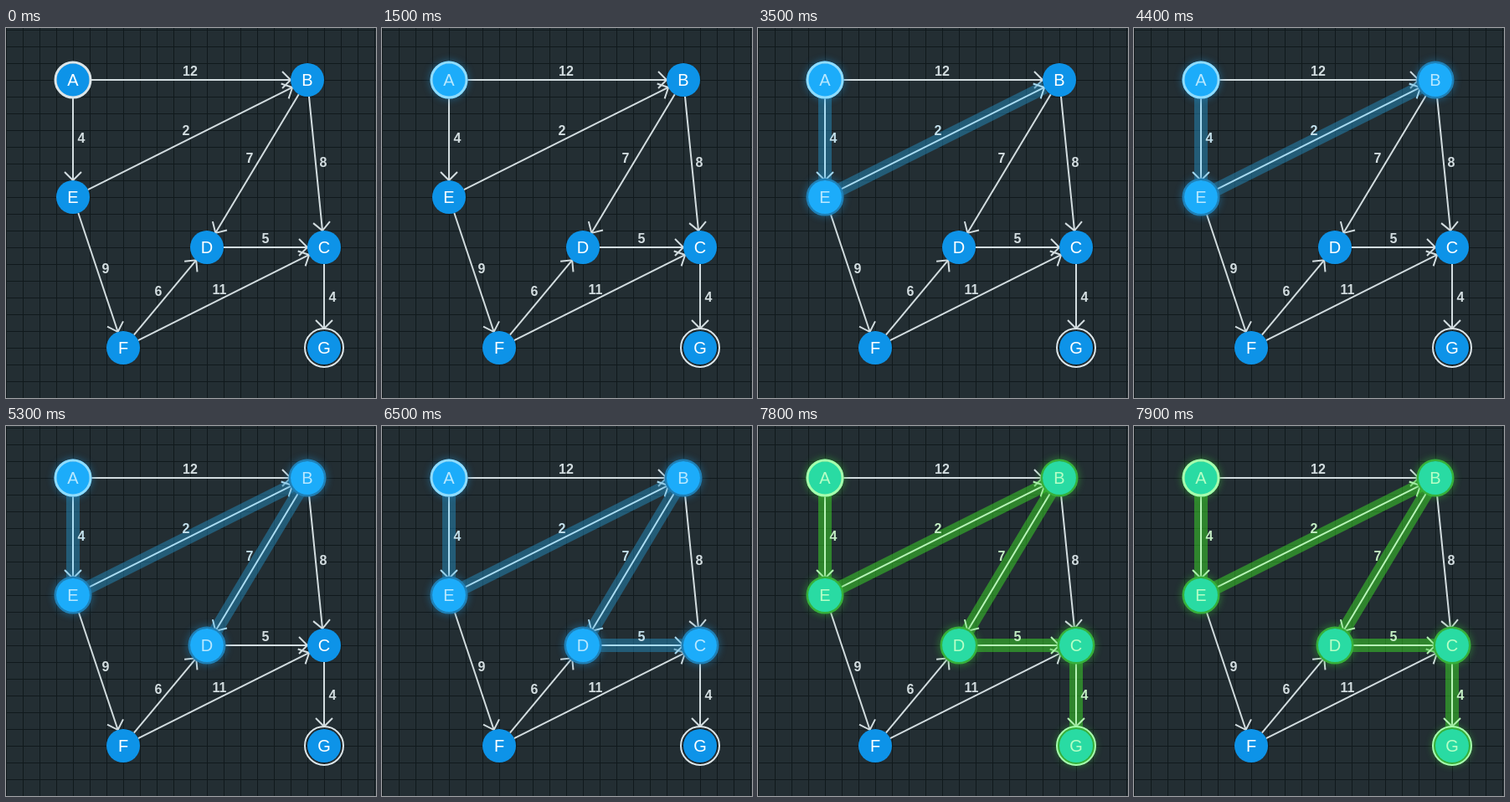
Recreate the animation shown at these times as an HTML page with a canvas. Size 442 by 442 pixels, loop 8 s.

```html
<!DOCTYPE html>
<html lang="en">
<head>
<meta charset="utf-8">
<title>Shortest path</title>
<style>
  html, body { margin: 0; width: 100%; height: 100%; overflow: hidden; background: #232e33; }
  canvas { display: block; }
</style>
</head>
<body>
<canvas width="442" height="442"></canvas>
<script>
const ctx = document.querySelector('canvas').getContext('2d');
const SIZE = 442, LOOP = 8000, DONE = 7800, RADIUS = 20;
const FONT = '"Liberation Sans", Arial, sans-serif';

// lit: the time at which the search reaches the node or edge
const nodes = {
  A: { x: 80, y: 62, lit: 1500, start: true },
  B: { x: 360, y: 62, lit: 4000 },
  C: { x: 380, y: 262, lit: 6500 },
  D: { x: 240, y: 262, lit: 5300 },
  E: { x: 80, y: 202, lit: 2800 },
  F: { x: 140, y: 382 },
  G: { x: 380, y: 382, lit: DONE, goal: true }
};

// dx, dy: label offset from the middle of the edge
const edges = [
  { from: 'A', to: 'B', weight: 12, dx: 0, dy: -10 },
  { from: 'A', to: 'E', weight: 4, dx: 10, dy: 0, lit: 2100 },
  { from: 'E', to: 'B', weight: 2, dx: -5, dy: -9, lit: 3400 },
  { from: 'B', to: 'D', weight: 7, dx: -9, dy: -6, lit: 4700 },
  { from: 'B', to: 'C', weight: 8, dx: 9, dy: -1 },
  { from: 'E', to: 'F', weight: 9, dx: 9, dy: -4 },
  { from: 'F', to: 'D', weight: 6, dx: -8, dy: -7 },
  { from: 'F', to: 'C', weight: 11, dx: -5, dy: -9 },
  { from: 'D', to: 'C', weight: 5, dx: 0, dy: -10, lit: 5900 },
  { from: 'C', to: 'G', weight: 4, dx: 10, dy: 0, lit: 7100 }
];

const plain = { fill: '#0d93e8', ring: '#dce5e8', text: '#ffffff', line: '#d3dde0', label: '#d3dde0' };
const visited = {
  fill: '#1cacfa', ring: '#8fdcff', text: '#b8e8ff', line: '#aadcf2', label: '#c3e0ec',
  band: 'rgba(36,138,188,.5)', glow: '#1f7fb5'
};
const found = {
  fill: '#29dba3', ring: '#a6ffae', text: '#b6ffc6', line: '#b8f5b8', label: '#c4efc4',
  band: 'rgba(60,220,40,.5)', glow: '#36b03a'
};

function styleOf(item, t) {
  if (!(t >= item.lit)) return plain;
  return t >= DONE ? found : visited;
}

function stroke(color, width, points) {
  ctx.strokeStyle = color;
  ctx.lineWidth = width;
  ctx.beginPath();
  points.forEach(([x, y]) => ctx.lineTo(x, y));
  ctx.stroke();
}

function disc(x, y, radius, color) {
  ctx.fillStyle = color;
  ctx.beginPath();
  ctx.arc(x, y, radius, 0, 2 * Math.PI);
  ctx.fill();
}

function ring(x, y, radius, width, color) {
  ctx.strokeStyle = color;
  ctx.lineWidth = width;
  ctx.beginPath();
  ctx.arc(x, y, radius, 0, 2 * Math.PI);
  ctx.stroke();
}

function write(text, x, baseline, font, color) {
  ctx.font = `${font} ${FONT}`;
  ctx.fillStyle = color;
  ctx.fillText(text, x, baseline);
}

function drawGrid() {
  ctx.fillStyle = '#232e33';
  ctx.fillRect(0, 0, SIZE, SIZE);
  ctx.fillStyle = '#10191c';
  for (let p = 0; p < SIZE; p += 20) {
    ctx.fillRect(p, 0, 1, SIZE);
    ctx.fillRect(0, p + 2, SIZE, 1);
  }
}

function drawEdge(edge, t) {
  const a = nodes[edge.from], b = nodes[edge.to], style = styleOf(edge, t);
  const length = Math.hypot(b.x - a.x, b.y - a.y);
  const ux = (b.x - a.x) / length, uy = (b.y - a.y) / length;
  const end = length - (b.goal ? 23 : RADIUS);
  const at = (along, side) => [a.x + ux * along - uy * side, a.y + uy * along + ux * side];
  const shaft = [at(RADIUS, 0), at(end, 0)];
  if (style.band) stroke(style.band, 16, shaft);
  stroke(style.line, 2, shaft);
  stroke(style.line, 2, [at(end - 10, -10), at(end, 0), at(end - 10, 10)]);
  write(edge.weight, (a.x + b.x) / 2 + edge.dx, (a.y + b.y) / 2 + edge.dy + 5, 'bold 16px', style.label);
}

function drawNode(name, t) {
  const node = nodes[name], { x, y } = node, style = styleOf(node, t);
  if (style.glow) {
    ctx.save();
    ctx.shadowColor = style.glow;
    ctx.shadowBlur = 8;
    ring(x, y, 21, 3, style.glow);
    ctx.restore();
  }
  disc(x, y, RADIUS, style.fill);
  if (node.start) ring(x, y, 21, 3, style.ring);
  if (node.goal) ring(x, y, 23, 2, style.ring);
  write(name, x, y + 7, '20px', style.text);
}

function draw(t) {
  drawGrid();
  ctx.textAlign = 'center';
  edges.forEach(edge => drawEdge(edge, t));
  Object.keys(nodes).forEach(name => drawNode(name, t));
}

const begin = performance.now();
function tick() {
  draw((performance.now() - begin) % LOOP);
  requestAnimationFrame(tick);
}
tick();
</script>
</body>
</html>
```
